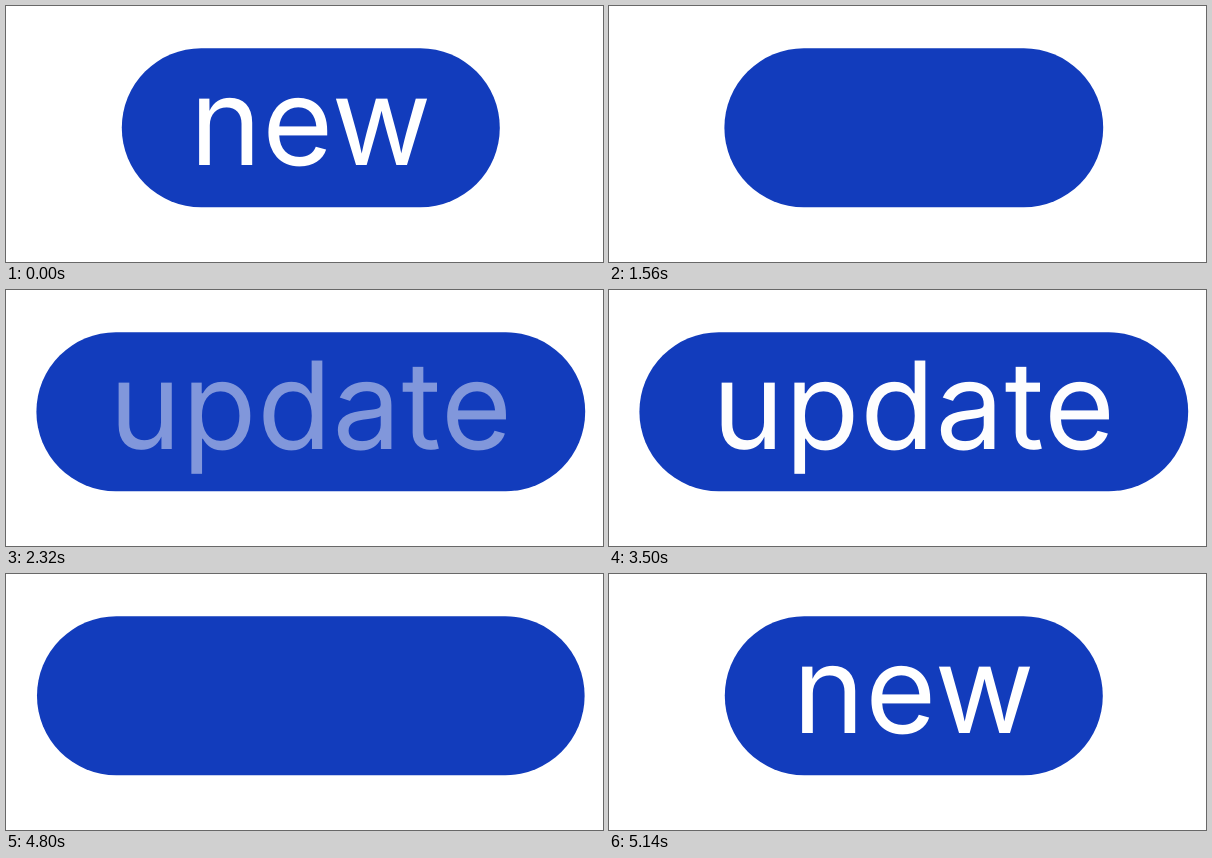
These frames come from a looping animation (597x256 px, 5240 ms). An HTML page:

```html
<!DOCTYPE html>
<html lang="en">
<head>
<meta charset="utf-8">
<title>Label</title>
<style>
  html, body { margin: 0; width: 100%; height: 100%; overflow: hidden; background: #fff; }
  svg { display: block; width: 597px; height: 256px; }
  rect { fill: #123cbc; }
  text {
    fill: #fff;
    font: 400 121.6px Inter, "Liberation Sans", sans-serif;
    font-optical-sizing: none;
    letter-spacing: .8px;
    text-anchor: middle;
    text-rendering: geometricPrecision;
  }
</style>
</head>
<body>
<svg viewBox="0 0 597 256">
  <rect id="pill" x="115.8" y="42.3" width="378" height="158.9" rx="79.4"/>
  <text id="short" x="304.9" y="158.5">new</text>
  <text id="long" x="304.9" y="158.5" opacity="0">update</text>
</svg>
<script>
  const LOOP = 5240;
  const CUT = 5140;
  const EASE = "cubic-bezier(.25,.1,.4,1)";
  const narrow = { x: "115.8px", width: "378px" };
  const wide = { x: "30.4px", width: "548.8px" };
  const shown = { opacity: 1 };
  const hidden = { opacity: 0 };

  // Each step: time in ms, state, and whether it eases into the next step.
  function play(id, steps) {
    const frames = steps.map(([time, state, eased]) => ({
      ...state, offset: time / LOOP, easing: eased ? EASE : "linear"
    }));
    return document.getElementById(id).animate(frames, { duration: LOOP, iterations: Infinity });
  }

  const tracks = [
    play("pill", [
      [0, narrow], [1557, narrow, true], [1930, wide],
      [4796, wide, true], [CUT, narrow], [LOOP, narrow]
    ]),
    play("short", [
      [0, shown], [978, shown, true], [1260, hidden],
      [CUT, hidden], [CUT, shown], [LOOP, shown]
    ]),
    play("long", [
      [0, hidden], [2228, hidden, true], [2512, shown],
      [3498, shown, true], [3780, hidden], [LOOP, hidden]
    ])
  ];
  const start = document.timeline.currentTime;
  tracks.forEach(track => { track.startTime = start; });
</script>
</body>
</html>
```
